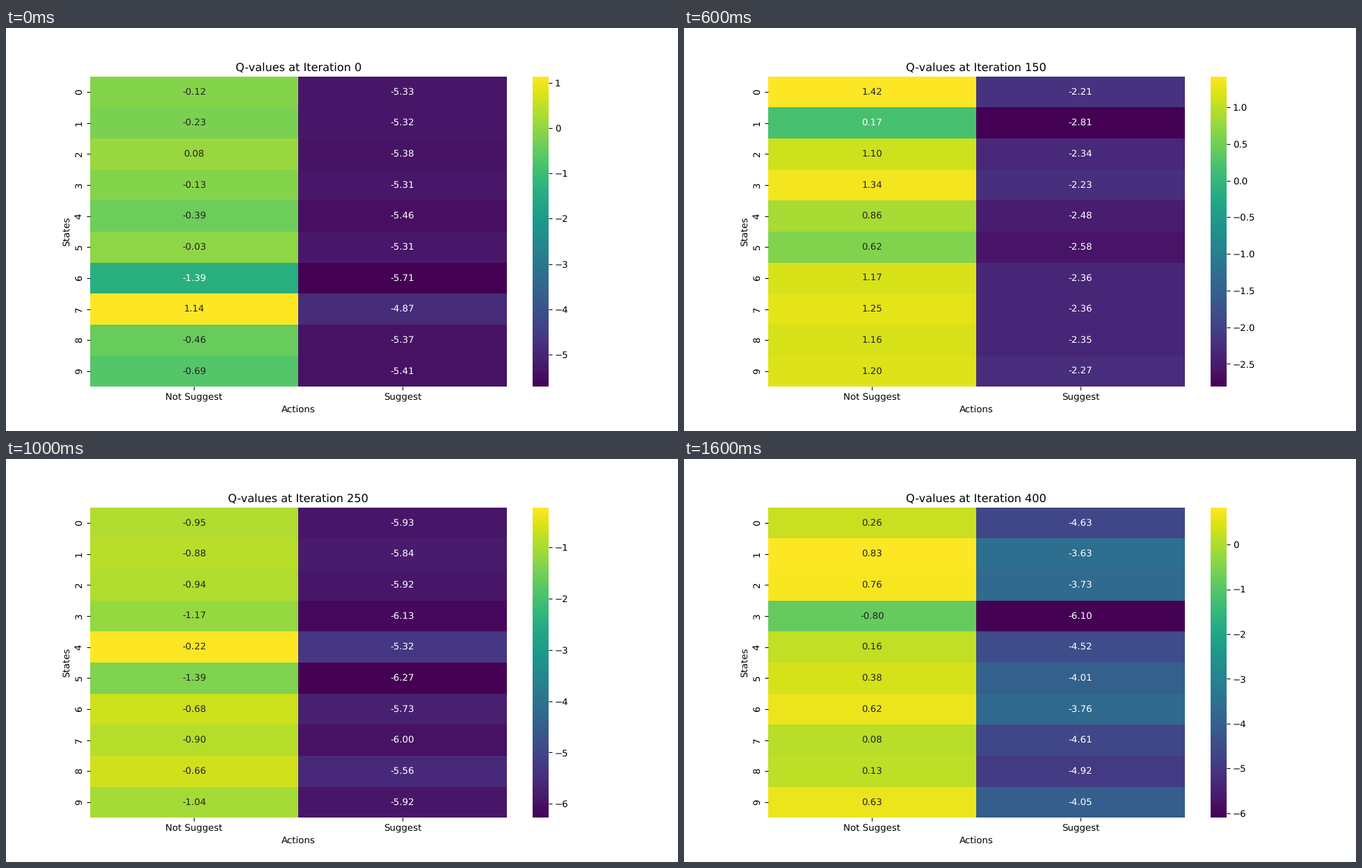
A matplotlib script for the animation above (1.8 s loop, 966 by 580 pixels).

```python
import numpy as np
import matplotlib.pyplot as plt
from matplotlib.animation import FuncAnimation

W, H, DPI = 966, 580, 100
SCALE = 0.966
STATES = 10
STEP = 50       # iterations between two pictures
FRAMES = 9
DARK_ABOVE = 0.402

plt.rcParams.update({
    "font.family": "DejaVu Sans",
    "text.hinting": "none",
    "font.size": 10 * SCALE,
    "axes.titlesize": 12 * SCALE,
    "axes.titlepad": 6 * SCALE,
    "axes.labelpad": 4 * SCALE,
})
for axis in ("xtick", "ytick"):
    plt.rcParams.update({
        f"{axis}.major.size": 3.5 * SCALE,
        f"{axis}.major.width": 0.8 * SCALE,
        f"{axis}.major.pad": 3.5 * SCALE,
    })

# Key points: iteration, best state, worst state, typical level between them,
# then the lowest and highest value of "Not Suggest" and of "Suggest"
KEYS = np.array([
    (0, 7, 6, 0.48, -1.39, 1.14, -5.71, -4.87),
    (100, 7, 5, 0.43, -0.99, 0.95, -5.85, -4.50),
    (150, 0, 1, 0.68, 0.17, 1.42, -2.81, -2.21),
    (250, 4, 5, 0.52, -1.39, -0.22, -6.27, -5.32),
    (350, 8, 2, 0.60, -0.83, 0.61, -5.73, -4.47),
    (400, 1, 3, 0.79, -0.80, 0.83, -6.10, -3.63),
]).T


def q_table(iteration):
    """Q-values (states x actions); both actions rank the states much alike."""
    best, worst, level, *limits = (
        np.interp(iteration, KEYS[0], key) for key in KEYS[1:])
    rng = np.random.default_rng(iteration)
    rank = level + 0.16 * rng.standard_normal(STATES)
    ranks = np.column_stack([rank, rank + 0.08 * rng.standard_normal(STATES)])
    ranks = ranks.clip(0.04, 0.96)
    ranks[int(best)] = 1
    ranks[int(worst)] = 0
    low, high = np.array(limits[::2]), np.array(limits[1::2])
    return low + (high - low) * ranks


def luminance(rgba):
    rgb = np.array(rgba[:3])
    linear = np.where(rgb <= 0.03928, rgb / 12.92, ((rgb + 0.055) / 1.055) ** 2.4)
    return linear @ [0.2126, 0.7152, 0.0722]


fig = plt.figure(figsize=(W / DPI, H / DPI), dpi=DPI, facecolor="white")
ax = fig.add_axes([0.125, 0.11, 0.62, 0.77])
bar_ax = fig.add_axes([0.784, 0.11, 0.023, 0.77])

mesh = ax.pcolormesh(q_table(0), cmap="viridis")
bar = fig.colorbar(mesh, cax=bar_ax)
bar.outline.set_visible(False)

ax.set(xlim=(0, 2), ylim=(STATES, 0), xlabel="Actions", ylabel="States")
ax.set_xticks([0.5, 1.5], ["Not Suggest", "Suggest"])
ax.set_yticks(np.arange(STATES) + 0.5, range(STATES), rotation="vertical", va="center")
ax.spines[:].set_visible(False)
title = ax.set_title("")

labels = {
    (row, col): ax.text(col + 0.5, row + 0.5, "", ha="center", va="center")
    for row in range(STATES) for col in range(2)
}


def update(frame):
    iteration = frame * STEP
    values = q_table(iteration)
    mesh.set_array(values)
    mesh.set_clim(values.min(), values.max())
    title.set_text(f"Q-values at Iteration {iteration}")
    for cell, label in labels.items():
        value = values[cell]
        dark = luminance(mesh.to_rgba(value)) > DARK_ABOVE
        label.set_text(f"{value:.2f}")
        label.set_color("0.15" if dark else "white")
    return [mesh, title, *labels.values()]


anim = FuncAnimation(fig, update, frames=FRAMES, interval=200, repeat=True)
plt.show()
```
